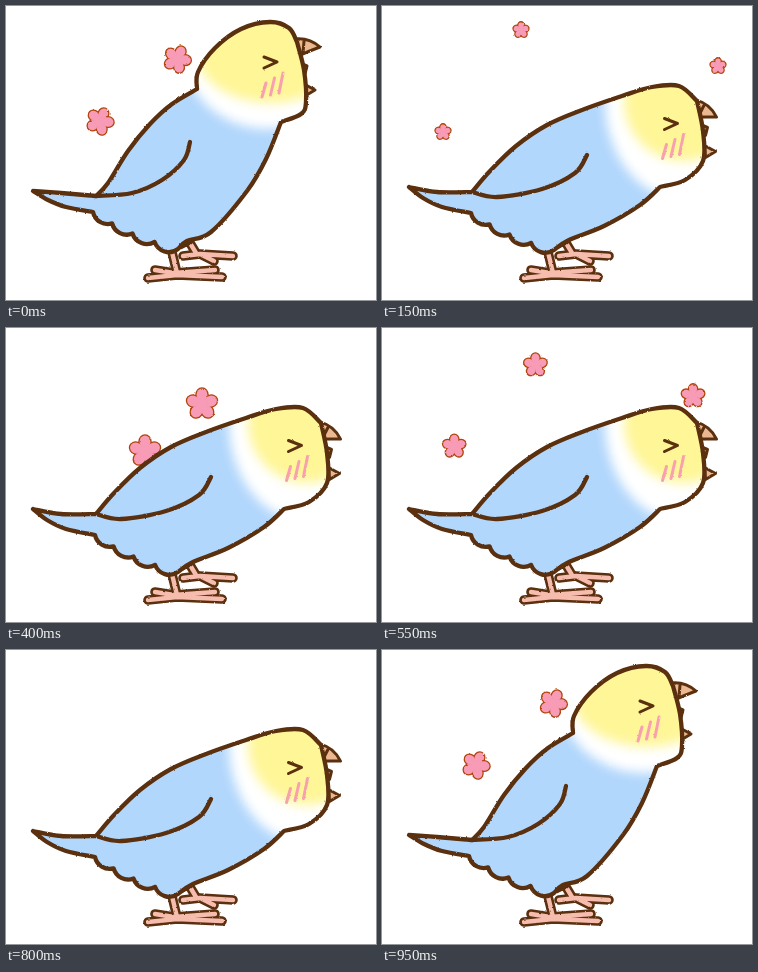
Recreate the animation shown at these times as an HTML page. Size 370x294 px, loop 1000 ms.

```html
<!DOCTYPE html>
<html lang="en">
<head>
<meta charset="utf-8">
<title>Chirping budgie</title>
<style>
  html, body { margin: 0; width: 100%; height: 100%; overflow: hidden; background: #fff; }
  svg { display: block; width: 100vw; height: 100vh; }
  path { fill: none; stroke-linecap: round; stroke-linejoin: round; }
  .ink { stroke: #5a300f; stroke-width: 4.3; }
  .fine { stroke: #5a300f; stroke-width: 3; }
  .beak { fill: #ebb891; }
  .cheek { stroke: #f9a0b0; stroke-width: 3; }
  .skin { stroke: #f6bcae; stroke-width: 4.4; }
  .edge { stroke: #5a300f; stroke-width: 9.6; }
</style>
</head>
<body>
<svg viewBox="0 0 370 294" preserveAspectRatio="none">
  <defs>
    <filter id="rough" filterUnits="userSpaceOnUse" x="0" y="0" width="370" height="294" color-interpolation-filters="sRGB">
      <feTurbulence type="fractalNoise" baseFrequency="0.3" numOctaves="2" seed="4"/>
      <feDisplacementMap in="SourceGraphic" scale="2" xChannelSelector="R" yChannelSelector="G"/>
    </filter>
    <filter id="soft" filterUnits="userSpaceOnUse" x="0" y="0" width="370" height="294" color-interpolation-filters="sRGB">
      <feGaussianBlur stdDeviation="5.5"/>
    </filter>
  </defs>
  <g filter="url(#rough)">
    <g id="flowers"></g>
    <g id="feet"></g>
    <g id="birds"></g>
  </g>
</svg>
<script>
const $ = id => document.getElementById(id);
const range = n => [...Array(n).keys()];
const path = (cls, d) => `<path class="${cls}" d="${d}"/>`;

// Smooth curve through points; "|" marks a sharp corner shared by both sides.
function curve(text) {
  let d = '', last = null;
  for (const part of text.split('|')) {
    const p = part.trim().split(/\s+/).map(s => s.split(',').map(Number));
    if (last) p.unshift(last);
    else d = `M${p[0]}`;
    for (let i = 0; i < p.length - 1; i++) {
      const a = p[i - 1] || p[i], b = p[i], c = p[i + 1], e = p[i + 2] || c;
      const h1 = b.map((v, k) => v + (c[k] - a[k]) / 6);
      const h2 = c.map((v, k) => v - (e[k] - b[k]) / 6);
      d += `C${h1} ${h2} ${c}`;
    }
    last = p[p.length - 1];
  }
  return d;
}

// Row of feather bumps from the belly back to the tail, closing the body.
function feathers([x1, y1], [x2, y2], n = 4) {
  return range(n).map(i => {
    const t = (i + 1) / n, bow = 3 * Math.sin(Math.PI * t);
    return `A15 15 0 0 1 ${x1 + (x2 - x1) * t - bow} ${y1 + (y2 - y1) * t + bow}`;
  }).join('');
}

const poses = [
  { // head up
    tail: '27,185 55,187 90,190',
    front: '102,177 122,145 144,118 166,98 191,83 | 192,66 209,42 235,23 264,16 283,22 291,36 |' +
      '298,64 300,96 295,108 275,116 | 260,153 241,185 205,226 181,235 172,243',
    under: '87,206 60,201 42,194 27,185',
    wing: '90,190 126,187 156,174 178,154 184,136',
    collar: [262, 45, 85, 78], mask: [265, 45, 75, 52],
    face: '', tilt: 0
  },
  { // head down
    tail: '27,181 55,186 90,186',
    front: '108,165 134,140 165,119 200,104 240,90 270,81 297,80 315,95 |' +
      '321,125 321,155 303,174 278,181 | 258,199 222,220 187,234 172,244',
    under: '89,207 60,201 41,192 27,181',
    wing: '90,186 115,191 160,183 193,167 205,149',
    collar: [300, 95, 77, 98], mask: [301, 95, 59, 60],
    face: 'translate(24.5 61.5)', tilt: 22
  }
];

const blob = ([cx, cy, rx, ry], fill) =>
  `<ellipse cx="${cx}" cy="${cy}" rx="${rx}" ry="${ry}" fill="${fill}" filter="url(#soft)"/>`;

const beak = tilt => `<g transform="rotate(${tilt} 290 35)">
  ${path('fine beak', 'M288 33Q303 31 314 41Q303 45 290 51ZM298 35L297 47')}</g>
  ${path('fine beak', 'M294 57L301 60L299 68ZM298 78L309 84L299 90Z')}`;

const face = path('fine', 'M258 51L271 56L258 62') +
  range(3).map(k => path('cheek', `M${260 + 8.5 * k} ${77 - 5 * k}l-4 ${14 + 3 * k}`)).join('');

function bird(p, i) {
  const under = p.under.split(' ')[0].split(',').map(Number);
  const belly = p.front.split(' ').pop().split(',').map(Number);
  const body = curve(`${p.tail} | ${p.front}`) + feathers(belly, under) + curve(p.under).replace(/^M[^C]+/, '') + 'Z';
  return `<g visibility="hidden">
    <clipPath id="clip${i}"><path d="${body}"/></clipPath>
    <g transform="${p.face}">${beak(p.tilt)}</g>
    <g clip-path="url(#clip${i})">
      <rect width="370" height="294" fill="#b2d7fc"/>
      ${blob(p.collar, '#fff')}${blob(p.mask, '#fff698')}
    </g>
    ${path('ink', body)}${path('ink', curve(p.wing))}
    <g transform="${p.face}">${face}</g>
  </g>`;
}

// A leg with its toes: the same strokes, wide in brown and narrow in pink.
const foot = d => path('edge', d) + path('skin', d);

$('feet').innerHTML =
  foot('M181 232L190 247M177 250L194 248L227 250M196 249L208 255') +
  foot('M165 242L171 267M149 264L168 267L209 264M142 272L171 269L216 271') +
  path('ink', 'M175 241L185 236');
$('birds').innerHTML = poses.map(bird).join('');
const birds = [...$('birds').children];

// Start, bend and end of each flower's flight.
const flights = [
  [[196, 76], [168, 50], [139, 24]],
  [[139, 123], [78, 106], [61, 126]],
  [[255, 115], [283, 72], [336, 60]]
];
const bezier = ([a, b, c], t) =>
  a.map((v, k) => (1 - t) ** 2 * v + 2 * t * (1 - t) * b[k] + t * t * c[k]);

function flower([x, y], r, tilt) {
  const petals = range(5).map(k =>
    `<ellipse cx="${r * 0.56}" rx="${r * 0.38}" ry="${r * 0.33}" transform="rotate(${tilt + 72 * k})"/>`).join('');
  return `<g transform="translate(${x} ${y})">
    <g fill="#b0440c" stroke="#b0440c" stroke-width="2.6">${petals}</g>
    <g fill="#f79bb6">${petals}<circle r="${r * 0.35}"/></g>
  </g>`;
}

const LOOP = 500, TICK = 50, STAGES = 8, FLIGHT = 4;
let shown = -1;

function draw(time) {
  const tick = Math.floor((time % LOOP) / TICK);
  const stage = Math.ceil(tick * 0.8) % STAGES;
  if (stage === shown) return;
  shown = stage;
  birds.forEach((b, i) => b.setAttribute('visibility', stage % 2 === i ? 'visible' : 'hidden'));

  const age = (stage + 1) % STAGES;
  const ease = 1 - (1 - age / FLIGHT) ** 2;
  const tilt = age % 2 ? -66 : -90;
  $('flowers').innerHTML = age > FLIGHT ? '' :
    flights.map(f => flower(bezier(f, ease), 16.5 - 2.1 * age, tilt)).join('');
}

const start = performance.now();
function loop() {
  draw(performance.now() - start);
  requestAnimationFrame(loop);
}
loop();
</script>
</body>
</html>
```
